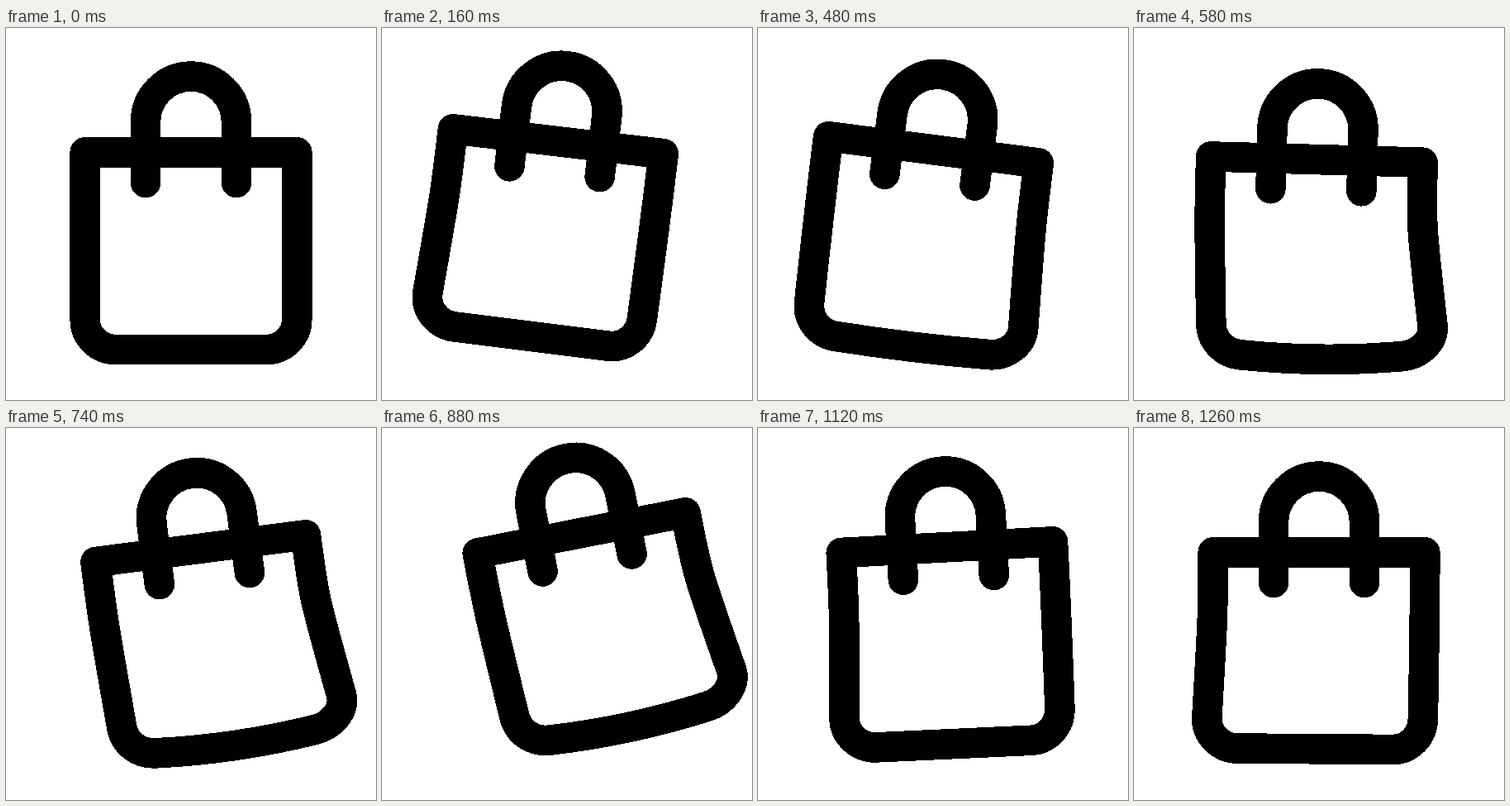
These frames come from a looping animation (448x450 px, 1.28 s). An HTML page:

```html
<!DOCTYPE html>
<html>
<head>
<meta charset="utf-8">
<style>
  html, body { margin: 0; width: 100%; height: 100%; overflow: hidden; background: #fff; }
  svg { display: block; width: 448px; height: 450px; }
  path { fill: none; stroke: #000; stroke-width: 36.6; stroke-linecap: round; stroke-linejoin: round; }
</style>
</head>
<body>
<svg viewBox="0 0 448 450" shape-rendering="crispEdges">
  <g id="bag">
    <path d="M169 187V113.6a55 55 0 0 1 110 0V187"/>
    <path id="body"/>
  </g>
</svg>
<script>
const LOOP = 1280;
const LEFT = 95.7, RIGHT = 352.3, TOP = 150.3, BOTTOM = 389, RADIUS = 36.7;
const bag = document.getElementById('bag');
const body = document.getElementById('body');

// [time, value] keys, eased in between; sway is how far the soft lower half leans.
const angle = [[0, 0], [300, 12], [900, -11.1], [1240, 0], [LOOP, 0]];
const lift = [[0, 0], [300, -22.3], [610, 9.5], [900, -22], [1240, 0], [LOOP, 0]];
const sway = [[0, 0], [300, -13], [610, 18], [900, 18], [1240, -16], [LOOP, 0]];

function sample(keys, t) {
  const i = keys.findIndex(([time]) => time > t);
  const [t0, from] = keys[i - 1], [t1, to] = keys[i];
  return from + (to - from) * (1 - Math.cos(Math.PI * (t - t0) / (t1 - t0))) / 2;
}

// A point beyond `to` on the line coming from `from`.
function extend(from, to) {
  const dx = to[0] - from[0], dy = to[1] - from[1];
  const s = RADIUS * 0.552 / Math.hypot(dx, dy);
  return [to[0] + dx * s, to[1] + dy * s];
}

// The lower corner on one side (-1 left, 1 right): the leading one moves further and rises.
function corner(side, lean) {
  const ahead = Math.max(0, lean * side);
  const edge = side < 0 ? LEFT : RIGHT;
  const x = edge + (ahead ? lean : lean / 3);
  return {
    bend: [edge, 225],
    wall: [x, BOTTOM - RADIUS - ahead * 0.3],
    base: [x - side * RADIUS, BOTTOM - ahead * 0.2],
  };
}

function bodyPath(lean) {
  const l = corner(-1, lean), r = corner(1, lean);
  const sag = Math.max(0, lean) * 0.35;
  const along = k => [
    r.base[0] + (l.base[0] - r.base[0]) * k,
    r.base[1] + (l.base[1] - r.base[1]) * k + sag,
  ];
  const nearR = along(1 / 3), nearL = along(2 / 3);
  const curve = (...points) => 'C' + points.join(' ');
  return `M${LEFT} ${TOP}H${RIGHT}` +
    curve(r.bend, r.bend, r.wall) +
    curve(extend(r.bend, r.wall), extend(nearR, r.base), r.base) +
    curve(nearR, nearL, l.base) +
    curve(extend(nearL, l.base), extend(l.bend, l.wall), l.wall) +
    curve(l.bend, l.bend, [LEFT, TOP]) + 'Z';
}

function draw() {
  const t = performance.now() % LOOP;
  bag.setAttribute('transform',
    `translate(0 ${sample(lift, t)}) rotate(${sample(angle, t)} 224 58.6)`);
  body.setAttribute('d', bodyPath(sample(sway, t)));
  requestAnimationFrame(draw);
}
draw();
</script>
</body>
</html>
```
